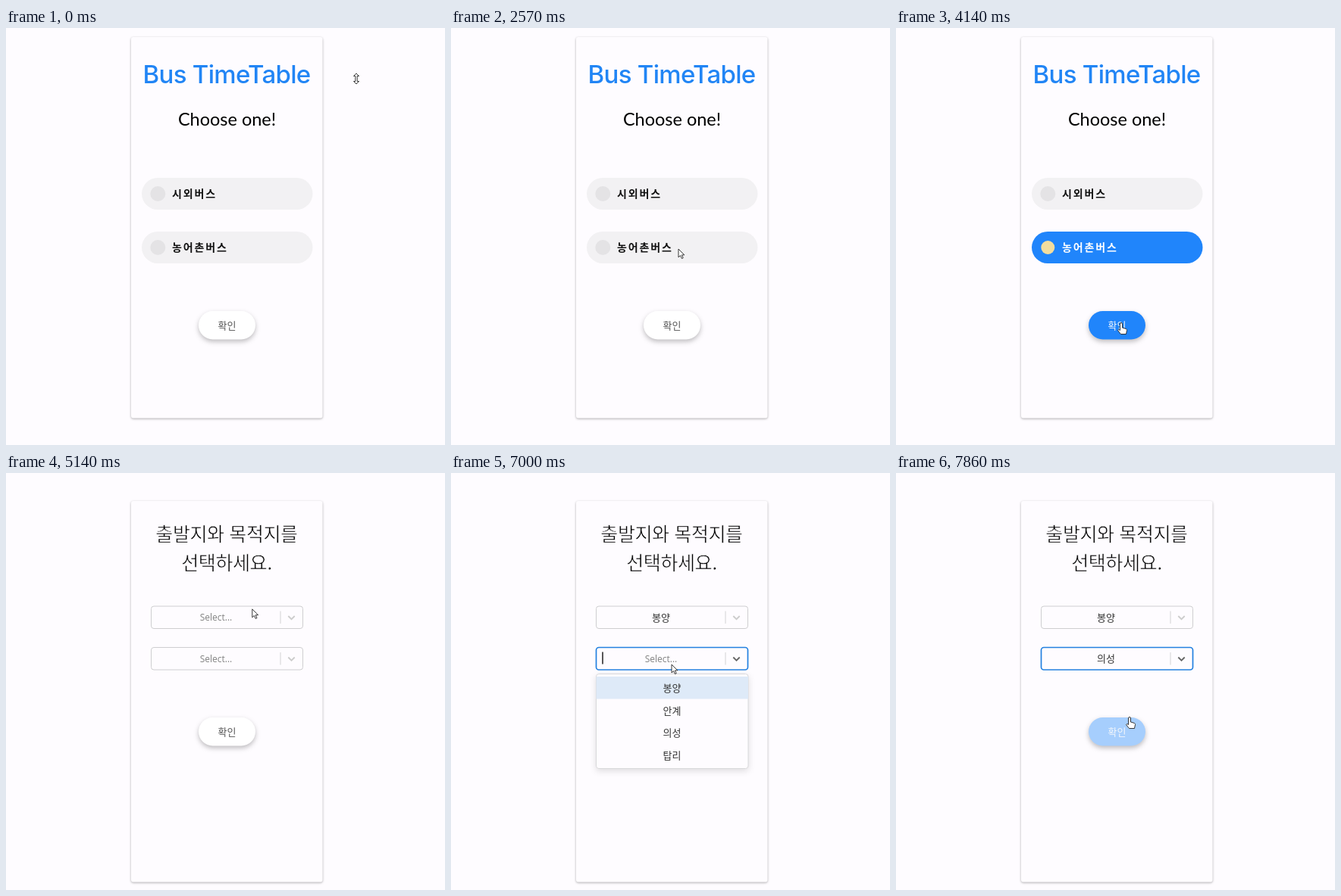
Recreate the animation shown at these times as an HTML page. Size 579 by 551 pixels, loop 8 s.

```html
<!DOCTYPE html>
<html lang="ko">
<head>
<meta charset="utf-8">
<title>Bus TimeTable</title>
<style>
  html, body { margin: 0; width: 100%; height: 100%; overflow: hidden; background: #fefcff; }
  svg { display: block; }
  text { font-family: "Noto Sans CJK KR", "Noto Sans CJK", sans-serif; text-anchor: middle; font-size: 13px; fill: #333; }
  .title { font: 500 33px Inter, sans-serif; letter-spacing: -.7px; fill: #2185f5; }
  .lead { font: 400 23.5px Lato, sans-serif; fill: #000; }
  .label { font-size: 14px; font-weight: 600; letter-spacing: 1.9px; text-anchor: start; }
  .heading { font-size: 25px; font-weight: 300; letter-spacing: -.4px; fill: #000; stroke: #fefcff; stroke-width: .6; }
  .hint { font: 12px "Open Sans", sans-serif; fill: #808080; }
  .card { fill: #fefcff; filter: drop-shadow(0 1px 1.5px rgba(0,0,0,.32)); }
  .button { filter: drop-shadow(0 3px 3px rgba(0,0,0,.25)); }
  .menu { fill: #fefcff; stroke: #d8d8da; filter: drop-shadow(0 3px 4px rgba(0,0,0,.12)); }
  .cursor { fill: #fff; stroke: #222; stroke-width: .9; }
</style>
</head>
<body>
<svg id="stage" width="579" height="551" viewBox="0 0 579 551"></svg>
<script>
const LOOP = 8000, STEPS = 56;
const BLUE = '#2085fb', PAPER = '#fefcff';
const TOWNS = ['봉양', '안계', '의성', '탑리'];
const ROW = 29.5;

// Pointer path: [step, x, y]
const PATH = [
  [2, 462, 67], [5, 250, 22], [7, 112, 120], [10, 333, 343], [13, 333, 343],
  [17, 300, 292], [21, 296, 292], [24, 297, 350], [25, 297, 374], [26, 297, 390],
  [30, 297, 390], [36, 327, 163], [39, 300, 188], [41, 298, 190], [44, 299, 229],
  [45, 299, 229], [47, 290, 246], [49, 291, 253], [52, 291, 338], [53, 291, 340], [55, 308, 323]
];

const clamp = (v, lo = 0, hi = 1) => Math.min(hi, Math.max(lo, v));
const mix = (from, to, p) => `color-mix(in srgb, ${to} ${p * 100}%, ${from})`;
const text = (x, y, str, cls = '', fill = '') =>
  `<text x="${x}" y="${y}" class="${cls}" ${fill && `style="fill:${fill}"`}>${str}</text>`;
const rect = (x, y, w, h, r, attrs) =>
  `<rect x="${x}" y="${y}" width="${w}" height="${h}" rx="${r}" ${attrs}/>`;

function pointerAt(step) {
  const i = PATH.findIndex(k => k[0] > step);
  if (i < 0) return PATH.at(-1).slice(1);
  if (i === 0) return PATH[0].slice(1);
  const [s0, x0, y0] = PATH[i - 1], [s1, x1, y1] = PATH[i];
  const p = (step - s0) / (s1 - s0), e = p * p * (3 - 2 * p);
  return [x0 + (x1 - x0) * e, y0 + (y1 - y0) * e];
}

function cursor([x, y], kind) {
  const shapes = {
    arrow: 'M0 0v11l2.6-2.4 1.8 4 1.8-.8-1.8-3.9h3.4z',
    hand: 'M-1.5 1a1.5 1.5 0 0 1 3 0v5l5 1.5q1 .5 1 2l-1 5h-7l-4-5q1-2 3 0z',
    resize: 'M0-7l3.5 3.5h-2.3v7h2.3l-3.5 3.5-3.5-3.5h2.3v-7h-2.3z'
  };
  return `<path class="cursor" transform="translate(${x} ${y})" d="${shapes[kind]}"/>`;
}

const card = y => rect(165, y, 252.5, 503.5, 3, 'class="card"');

const button = (y, hover) =>
  rect(254, y, 75, 37.5, 18.75, `class="button" style="fill:${mix('#fff', BLUE, hover)}"`) +
  text(291.5, y + 23.5, '확인', '', hover ? '#f4f7fb' : '#555');

const option = (y, label, on) =>
  rect(179, y, 225.5, 42, 21, `style="fill:${mix('#f2f1f3', BLUE, on)}"`) +
  `<circle cx="200.3" cy="${y + 21}" r="${10 - on}" style="fill:${mix('#e4e3e5', '#f3dd9e', on)}"/>` +
  text(219, y + 26.3, label, 'label', mix('#111', '#fff', on));

function select(y, value, focused, caret) {
  const border = focused ? 'stroke="#2381e0" stroke-width="1.7"' : 'stroke="#ceced0"';
  return rect(191.5, y, 200, 29.5, 3.5, `fill="${PAPER}" ${border}`) +
    `<path d="M362 ${y + 6.5}v16.5" stroke="#d2d2d4"/>` +
    `<path d="M372.3 ${y + 13}l4.2 4.2 4.2-4.2" fill="none" stroke="${focused ? '#666' : '#ccc'}" stroke-width="1.8"/>` +
    (value ? text(277, y + 19.5, value) : text(277, y + 19.3, 'Select...', 'hint')) +
    (caret ? `<path d="M200 ${y + 6}v16" stroke="#111" stroke-width="1.4"/>` : '');
}

function menu(y, pointerY, pressed) {
  const active = clamp(Math.floor((pointerY - y - 3) / ROW), 0, 3);
  return rect(191.5, y, 200.5, 125, 3.5, 'class="menu"') +
    rect(191.5, y + 3.5 + active * ROW, 200.5, ROW, 0, `fill="${pressed ? '#b3d5f8' : '#deeaf8'}"`) +
    TOWNS.map((town, i) => text(291.5, y + 23.5 + i * ROW, town)).join('');
}

function choosePage(step) {
  return card(12) +
    text(291, 73, 'Bus TimeTable', 'title') +
    text(291.5, 129.3, 'Choose one!', 'lead') +
    option(198, '시외버스', 0) +
    option(269, '농어촌버스', clamp((step - 19) / 3)) +
    button(374, clamp((step - 25) * .4));
}

function routePage(step, pointerY) {
  const focusFirst = step >= 38 && step < 47, focusSecond = step >= 47;
  const from = step >= 46 && TOWNS[0], to = step >= 53 && TOWNS[2];
  const blink = (step >> 2) % 2 === 0;
  return card(37) +
    text(291, 90, '출발지와 목적지를', 'heading') +
    text(291, 128, '선택하세요.', 'heading') +
    select(176, from, focusFirst, focusFirst && !from && blink) +
    select(230.5, to, focusSecond, focusSecond && !to && blink) +
    button(323, clamp((step - 54) * .4)) +
    (step >= 39 && step < 46 ? menu(211, pointerY, step >= 44) : '') +
    (step >= 48 && step < 53 ? menu(265.5, pointerY, false) : '');
}

function draw(step) {
  const pointer = pointerAt(step);
  const overButton = (step > 25 && step < 29) || step === 55;
  const kind = step < 3 ? 'resize' : overButton ? 'hand' : 'arrow';
  stage.innerHTML = (step < 29 ? choosePage(step) : routePage(step, pointer[1])) + cursor(pointer, kind);
}

const stage = document.getElementById('stage');
let shown = -1;
function tick() {
  const step = Math.floor(performance.now() % LOOP / LOOP * STEPS);
  if (step !== shown) draw(shown = step);
  requestAnimationFrame(tick);
}
tick();
</script>
</body>
</html>
```
